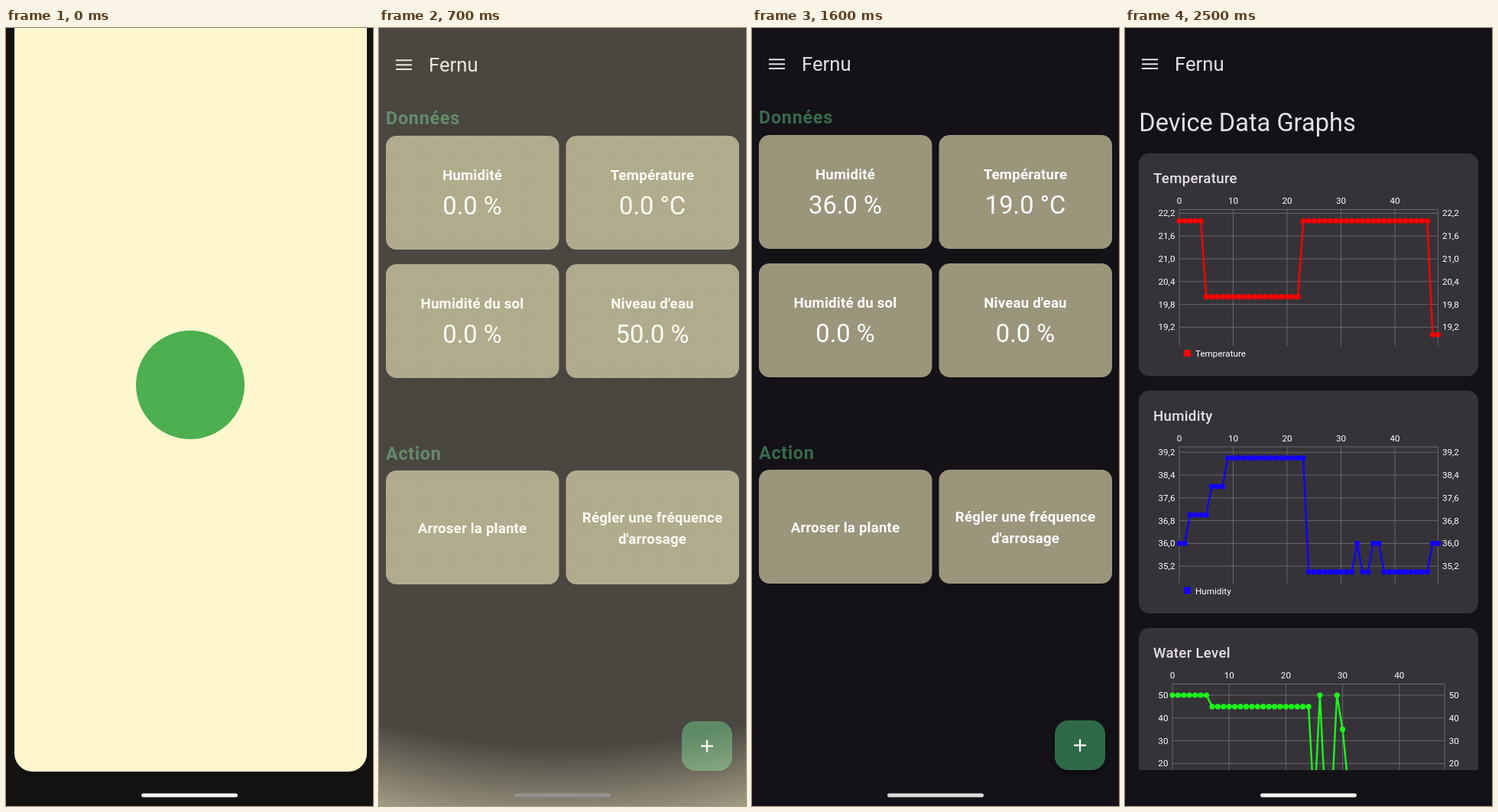
An HTML page that plays this animation: 480x1018 px, repeating every 3.9 s.

```html
<!DOCTYPE html>
<html lang="fr">
<head>
<meta charset="utf-8">
<title>Plant monitor</title>
<style>
  html, body { margin: 0; width: 100%; height: 100%; overflow: hidden; background: #131211; }
  svg { display: block; width: 100%; height: 100%; font-family: Roboto, sans-serif; }
  .bar { font-size: 25.7px; fill: #e5e1e6; }
  .head { font-size: 23.4px; font-weight: 700; letter-spacing: .7px; fill: #386a4d; }
  .label { font-size: 18.7px; font-weight: 700; letter-spacing: .18px; fill: #fff; text-anchor: middle; }
  .value { font-size: 32.7px; fill: #fff; text-anchor: middle; }
  .title { font-size: 32.6px; fill: #e5e1e6; }
  .name { font-size: 18.7px; font-weight: 500; letter-spacing: .28px; fill: #e5e1e6; }
  .tick { font-size: 11.7px; fill: #fff; }
</style>
</head>
<body>
<svg id="stage" viewBox="0 0 480 1018">
  <defs>
    <radialGradient id="veil" gradientUnits="userSpaceOnUse" cx="240" cy="0" r="1160">
      <stop stop-color="#fff7cd"/>
      <stop stop-color="#fff7cd"/>
      <stop offset="1" stop-color="#fff7cd"/>
    </radialGradient>
    <filter id="shadow" x="-30%" y="-30%" width="160%" height="160%">
      <feDropShadow dx="0" dy="4" stdDeviation="4" flood-color="#000" flood-opacity=".4"/>
    </filter>
    <clipPath id="body"><rect y="80" width="480" height="891"/></clipPath>
  </defs>
</svg>
<script>
const LOOP = 3900, STEP = 100;
const stage = document.getElementById('stage');

function add(parent, tag, attrs, text) {
  const el = document.createElementNS('http://www.w3.org/2000/svg', tag);
  set(el, attrs);
  if (text !== undefined) el.textContent = text;
  parent.append(el);
  return el;
}
function set(el, attrs) {
  for (const k in attrs) el.setAttribute(k, attrs[k]);
}
const group = (parent, attrs = {}) => add(parent, 'g', attrs);
const write = (parent, cls, x, y, text, attrs = {}) =>
  add(parent, 'text', { class: cls, x, y, ...attrs }, text);
const rect = (parent, x, y, width, height, rx, fill) =>
  add(parent, 'rect', { x, y, width, height, rx, fill });

// App shell
const app = group(stage);
rect(app, 0, -20, 480, 1060, 0, '#141217');
add(app, 'path', { d: 'M22 41.3H43M22 47.2H43M22 53.1H43', stroke: '#e5e1e6', 'stroke-width': 2 });
write(app, 'bar', 65, 56, 'Fernu');

// Dashboard
const home = group(app);
write(home, 'head', 9, 125, 'Données');
write(home, 'head', 9, 563.5, 'Action');

function card(col, y, lines) {
  const x = col ? 244.5 : 9, mid = x + 113;
  rect(home, x, y, 226.5, 149, 14, '#9a957b');
  lines.forEach(([text, dy]) => write(home, 'label', mid, y + dy, text));
  return mid;
}
function gauge(col, y, label) {
  const mid = card(col, y, [[label, 57.5]]);
  return write(home, 'value', mid, y + 102.5, '');
}
const gauges = [
  gauge(0, 140, 'Humidité'),
  gauge(1, 140, 'Température'),
  gauge(0, 308, 'Humidité du sol'),
  gauge(1, 308, "Niveau d'eau")
];
card(0, 578, [['Arroser la plante', 81.5]]);
card(1, 578, [['Régler une fréquence', 67.5], ["d'arrosage", 95.5]]);

rect(home, 396, 906, 66, 65, 18, '#2f6b47').setAttribute('filter', 'url(#shadow)');
add(home, 'path', { d: 'M421 938.7H437M429 930.7V946.7', stroke: '#fff', 'stroke-width': 2.2 });

// Loading ring
const ring = add(app, 'path', {
  fill: 'none', stroke: '#386a4d', 'stroke-width': 4.67, 'stroke-linecap': 'round'
});

// Graph page
const graphs = group(app, { 'clip-path': 'url(#body)' });
write(graphs, 'title', 18.3, 135, 'Device Data Graphs');

// first: height of the top label; ticks: [top label, step, count]; runs: [value, count] pairs
function chart({ y, first, name, color, x0, dx, ticks, digits, runs }) {
  const x1 = x0 + 48 * dx, top = y + 73.5, bottom = y + 252, gap = 29.8;
  rect(graphs, 18, y, 444, 291.5, 14, '#363338');
  write(graphs, 'name', 37, y + 39, name);

  let grid = `M${x0} ${top}H${x1}V${bottom}M${x0} ${top}V${bottom}`;
  for (let n = 0; n < 50; n += 10) {
    const x = x0 + n * dx;
    if (n) grid += `M${x} ${top}V${bottom}`;
    write(graphs, 'tick', x, y + 66, n, { 'text-anchor': 'middle' });
  }
  const [start, step, count] = ticks;
  for (let i = 0; i < count; i++) {
    const ty = first + i * gap;
    const text = (start - i * step).toFixed(digits).replace('.', ',');
    grid += `M${x0} ${ty}H${x1}`;
    write(graphs, 'tick', x0 - 5.5, ty + 4, text, { 'text-anchor': 'end' });
    write(graphs, 'tick', x1 + 5.5, ty + 4, text);
  }
  add(graphs, 'path', { d: grid, fill: 'none', stroke: '#69666b', 'stroke-width': 1 });

  const points = runs.flatMap(([v, n]) => Array(n).fill(v))
    .map((v, i) => [x0 + i * dx, first + (start - v) / step * gap]);
  add(graphs, 'polyline', { points: points.join(' '), fill: 'none', stroke: color, 'stroke-width': 2.4 });
  points.forEach(([cx, cy]) => add(graphs, 'circle', { cx, cy, r: 3.6, fill: color }));

  rect(graphs, 77, y + 257, 9, 9, 1, color);
  write(graphs, 'tick', 92, y + 266, name);
}
chart({
  y: 164, first: 242.4, name: 'Temperature', color: '#f00', x0: 71, dx: 7.05,
  ticks: [22.2, .6, 6], digits: 1,
  runs: [[22, 5], [20, 18], [22, 24], [19, 2]]
});
chart({
  y: 474.5, first: 555.2, name: 'Humidity', color: '#1200ff', x0: 71, dx: 7.05,
  ticks: [39.2, .8, 6], digits: 1,
  runs: [[36, 2], [37, 4], [38, 3], [39, 15], [35, 9], [36, 1], [35, 2], [36, 2], [35, 9], [36, 2]]
});
chart({
  y: 785, first: 873, name: 'Water Level', color: '#1cf51c', x0: 62, dx: 7.42,
  ticks: [50, 10, 6], digits: 0,
  runs: [[50, 7], [45, 18], [0, 1], [50, 1], [0, 2], [50, 1], [35, 1], [10, 1], [0, 17]]
});

// Splash window
const splash = group(stage);
const backdrop = rect(splash, 0, 0, 480, 1018, 0, '#131211');
const sheet = rect(splash, 0, 0, 480, 1018, 0, '#fff7cd');
const logo = add(splash, 'circle', { r: 71, fill: '#4caf50' });
const veil = rect(stage, 0, 0, 480, 1018, 0, 'url(#veil)');
const stops = document.querySelectorAll('#veil stop');
const pill = rect(stage, 177, 1001.5, 126, 5, 2.5, '#fff');

// Linear track through [time, value] pairs
function track(t, keys) {
  let i = 1;
  while (i < keys.length - 1 && t > keys[i][0]) i++;
  const [t0, a] = keys[i - 1], [t1, b] = keys[i];
  return a + (b - a) * Math.min(1, Math.max(0, (t - t0) / (t1 - t0)));
}

// cubic-bezier(.4, 0, .2, 1)
function ease(x) {
  if (x <= 0) return 0;
  if (x >= 1) return 1;
  let lo = 0, hi = 1, s = .5;
  for (let i = 0; i < 20; i++) {
    s = (lo + hi) / 2;
    const px = 1.2 * s * (1 - s) ** 2 + .6 * s * s * (1 - s) + s ** 3;
    if (px < x) lo = s; else hi = s;
  }
  return s * s * (3 - 2 * s);
}

function arc(from, sweep) {
  const at = deg => {
    const a = deg * Math.PI / 180;
    return `${240 + 21 * Math.cos(a)} ${537 + 21 * Math.sin(a)}`;
  };
  return `M${at(from)}A21 21 0 ${sweep > 180 ? 1 : 0} 1 ${at(from + sweep)}`;
}

const SPIN = 1822, GRAPHS = 2500;

function draw(t) {
  // Window opening
  const gap = track(t, [[0, 1], [100, .28], [200, .06], [300, 0]]);
  const opening = t < 600;
  splash.style.display = t < 700 ? '' : 'none';
  backdrop.style.display = sheet.style.display = opening ? '' : 'none';
  set(sheet, {
    x: 11 * gap, y: -30 * gap, width: 480 - 19 * gap,
    height: 1018 - 15 * gap, rx: 24 * Math.min(1, gap * 1.5)
  });
  set(logo, {
    cx: 239.5 + 1.5 * gap, cy: 483 - 16 * gap,
    opacity: track(t, [[400, 1], [500, .58], [600, .12], [700, 0]])
  });

  // Reveal from the top
  veil.style.display = !opening && t < 900 ? '' : 'none';
  const inner = track(t, [[600, .6], [700, .23], [800, .03], [900, 0]]);
  const edge = track(t, [[600, .4], [700, .81], [800, 1]]);
  set(stops[0], { 'stop-opacity': inner });
  set(stops[1], { 'stop-opacity': inner, offset: edge });
  set(stops[2], { 'stop-opacity': t < 800 ? 1 : inner, offset: Math.min(1, edge + .2) });
  set(app, { transform: `translate(0 ${track(t, [[600, 6], [700, 1], [800, 0]])})` });

  const values = t < 800
    ? ['0.0 %', '0.0 °C', '0.0 %', '50.0 %']
    : ['36.0 %', '19.0 °C', '0.0 %', '0.0 %'];
  gauges.forEach((el, i) => { if (el.textContent !== values[i]) el.textContent = values[i]; });

  // Dashboard gives way to the loader, then the graphs
  const spin = t - SPIN;
  const out = ease(spin / 300);
  home.style.display = out < 1 ? '' : 'none';
  home.style.opacity = 1 - out;
  ring.style.display = spin > 0 && t < GRAPHS ? '' : 'none';
  ring.style.opacity = out;
  set(ring, { d: arc(-90 + 286 * spin / 1332, 290 * ease(spin / 666)) });
  graphs.style.display = t >= GRAPHS ? '' : 'none';

  const g = Math.round(track(t, [[0, 245], [300, 240], [500, 206], [700, 146],
    [800, 120], [1000, 120], [1600, 222], [1900, 240], [2300, 245]]));
  set(pill, { fill: `rgb(${g},${g - 1},${g - 2})` });
}

const begin = performance.now();
let last = -1;
function tick() {
  const now = (performance.now() - begin) % LOOP;
  const t = Math.floor(now / STEP) * STEP;
  if (t !== last) draw(last = t);
  requestAnimationFrame(tick);
}
tick();
</script>
</body>
</html>
```
